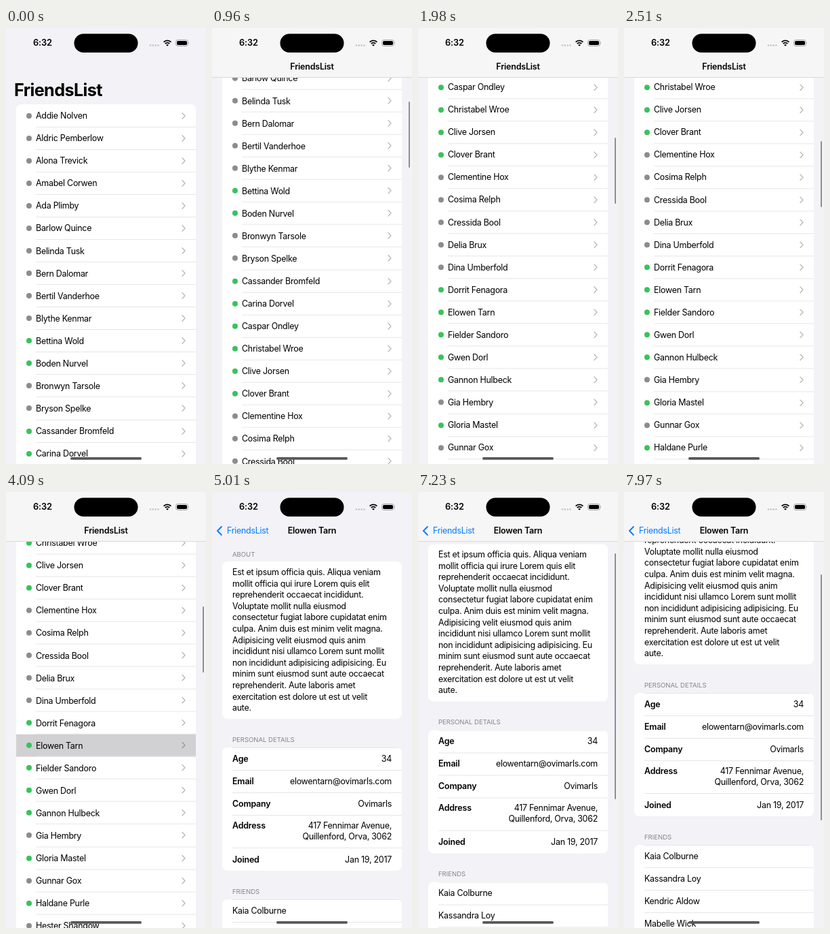
These frames come from a looping animation (295 by 640 pixels, 8 s). An HTML page:

```html
<!DOCTYPE html>
<html lang="en">
<head>
<meta charset="utf-8">
<title>FriendsList</title>
<style>
html, body { margin: 0; width: 100%; height: 100%; overflow: hidden; background: #f2f2f7; }
#stage { position: relative; width: 295px; height: 640px; overflow: hidden; color: #000;
  font: 12.5px Inter, "Noto Sans", sans-serif; letter-spacing: -.29px; }
#stage div, #stage svg { position: absolute; box-sizing: border-box; }
.page { inset: 0; background: #f2f2f7; }
.clip { inset: 73px 0 0; overflow: hidden; }
.scroll { left: 0; top: -73px; width: 295px; height: 1400px; white-space: pre; }
.bar { left: 0; top: 0; width: 295px; height: 73px; background: #f6f6f7; border-bottom: 1px solid #d9d9dc; }
.thumb { left: 290px; width: 2.4px; border-radius: 2px; background: #8f8f92; }
.card { left: 15px; width: 265px; background: #fff; border-radius: 7.5px; overflow: hidden; }
.row { left: 0; width: 265px; line-height: 33.06px; }
.line { right: 0; height: 1px; background: #e6e6e8; }
.dot { left: 15px; top: 12.5px; width: 8px; height: 8px; border-radius: 50%; }
.head { left: 30px; line-height: 14px; font-size: 9.6px; letter-spacing: -.05px; color: #86868b; }
.bold, .title { font-weight: 600; letter-spacing: -.22px; }
.value { top: 0; right: 15px; text-align: right; }
.title { left: 0; top: 47px; width: 295px; line-height: 20px; text-align: center; }
.large { left: 12px; top: 75px; font-size: 25.2px; line-height: 32px; font-weight: 700; letter-spacing: -.6px; }
.about { left: 15px; top: 8px; line-height: 16.6px; }
#back { left: 0; top: 47px; line-height: 20px; color: #007aff; }
#dim { inset: 0; background: #000; }
#time { left: 34px; width: 40px; top: 12px; line-height: 20px; font-size: 12.8px; font-weight: 600;
  text-align: center; letter-spacing: -.1px; }
</style>
</head>
<body>
<div id="stage">
  <div class="page" id="list">
    <div class="clip"><div class="scroll"><div class="large">FriendsList</div></div></div>
    <div class="bar"></div><div class="thumb" style="height:97px"></div>
  </div>
  <div id="dim"></div>
  <div class="page" id="detail">
    <div class="clip"><div class="scroll"></div></div>
    <div class="bar"></div><div class="thumb" style="height:361px"></div>
  </div>
  <div class="title" id="listTitle">FriendsList</div>
  <div class="title" id="detailTitle">Elowen Tarn</div>
  <div id="back">
    <svg width="20" height="20" style="left:0;top:0"><path d="M14 4L8 10l6 6" fill="none" stroke="#007aff" stroke-width="1.8" stroke-linecap="round" stroke-linejoin="round"/></svg>
    <div id="backLabel" style="left:22px;top:0">FriendsList</div>
  </div>
  <div id="time">6:32</div>
  <svg width="295" height="640" style="left:0;top:0">
    <rect x="100.5" y="8.5" width="94" height="27.6" rx="13.8"/>
    <path d="M213 25.5h13" stroke="#c3c3c6" stroke-width="2.6" stroke-linecap="round" stroke-dasharray="0 3.8"/>
    <g fill="none" stroke="#000" stroke-width="1.9">
      <path d="M232.6 20.6a7.6 7.6 0 0 1 10.8 0M234.8 23a4.5 4.5 0 0 1 6.4 0"/>
      <rect x="250.5" y="17.5" width="18" height="9" rx="3" stroke="#a5a5a8" stroke-width="1"/>
    </g>
    <path d="M236.2 24.9a2.5 2.5 0 0 1 3.6 0L238 26.8z"/>
    <rect x="252" y="19" width="15" height="6" rx="1.7"/>
    <path d="M269.6 20.4q1.6 1.6 0 3.2z" fill="#a5a5a8"/>
    <rect x="95" y="630" width="105" height="3.8" rx="1.9" fill="#58585a"/>
  </svg>
</div>
<script>
const ROW = 33.06, CHOSEN = 26, WIDTH = 295;
const names = `Addie Nolven,Aldric Pemberlow,Alona Trevick,Amabel Corwen,Ada Plimby,Barlow Quince,Belinda Tusk,
Bern Dalomar,Bertil Vanderhoe,Blythe Kenmar,Bettina Wold,Boden Nurvel,Bronwyn Tarsole,Bryson Spelke,
Cassander Bromfeld,Carina Dorvel,Caspar Ondley,Christabel Wroe,Clive Jorsen,Clover Brant,Clementine Hox,
Cosima Relph,Cressida Bool,Delia Brux,Dina Umberfold,Dorrit Fenagora,Elowen Tarn,Fielder Sandoro,Gwen Dorl,
Gannon Hulbeck,Gia Hembry,Gloria Mastel,Gunnar Gox,Haldane Purle,Hester Shandow`.split(/,\s*/);
const online = '00000000001100111111000001111101010';
const about = `Est et ipsum officia quis. Aliqua veniam
mollit officia qui irure Lorem quis elit
reprehenderit occaecat incididunt.
Voluptate mollit nulla eiusmod
consectetur fugiat labore cupidatat enim
culpa. Anim duis est minim velit magna.
Adipisicing velit eiusmod quis anim
incididunt nisi ullamco Lorem sunt mollit
non incididunt adipisicing adipisicing. Eu
minim sunt eiusmod sunt aute occaecat
reprehenderit. Aute laboris amet
exercitation est dolore ut est ut velit
aute.`;
const facts = [
  ['Age', '34'],
  ['Email', 'elowentarn@ovimarls.com'],
  ['Company', 'Ovimarls'],
  ['Address', '417 Fennimar Avenue,\nQuillenford, Orva, 3062'],
  ['Joined', 'Jan 19, 2017'],
];
const friends = ['Kaia Colburne', 'Kassandra Loy', 'Kendric Aldow', 'Mabelle Wick'];

const $ = s => document.querySelector(s);
const box = (cls, style, html = '') => `<div class="${cls}" style="${style}">${html}</div>`;
const card = (y, height, html) => box('card', `top:${y}px;height:${height}px`, html);
const line = (y, left) => box('line', `top:${y - .5}px;left:${left}px`);
const head = (y, text) => box('head', `top:${y - 7}px`, text);
const row = (y, html, height = ROW) => box('row', `top:${y}px;height:${height}px`, html);
const label = (left, text) => box('', `left:${left}px;top:0`, text);
const chevron = `<svg width="8" height="12" style="left:243px;top:10.5px"><path d="M2 1.8L6 6l-4 4.2"
  fill="none" stroke="#000" stroke-opacity=".27" stroke-width="1.4" stroke-linecap="round" stroke-linejoin="round"/></svg>`;

$('#list .scroll').innerHTML += card(112.2, ROW * names.length, names.map((name, i) =>
  row(i * ROW, box('dot', `background:${+online[i] ? '#38c35b' : '#8c8c90'}`) + label(29, name) + chevron)
  + line((i + 1) * ROW, 29)).join(''));

let factsHeight = 0;
const factRows = facts.map(([key, value]) => {
  const tall = value.includes('\n'), height = tall ? 48.4 : ROW;
  const shift = tall ? 'top:7.6px;line-height:16.6px' : 'top:0';
  const html = line(factsHeight, 15)
    + row(factsHeight, box('bold', `left:15px;${shift}`, key) + box('value', shift, value), height);
  factsHeight += height;
  return html;
}).join('');

$('#detail .scroll').innerHTML =
  head(92, 'ABOUT') + card(102, 230.7, box('about', '', about))
  + head(364.3, 'PERSONAL DETAILS') + card(375, factsHeight, factRows)
  + head(587.3, 'FRIENDS')
  + card(598, ROW * friends.length, friends.map((name, i) =>
      line(i * ROW, 15) + row(i * ROW, label(15, name))).join(''));

const chosenRow = document.querySelectorAll('#list .row')[CHOSEN];

// A flick: accelerating drag, then exponential slowdown.
function listOffset(t) {
  if (t < 595) return 0;
  if (t < 770) return 83 * ((t - 595) / 175) ** 2;
  return 622 - 143.5 * Math.exp((1445 - Math.min(t, 3095)) / 510);
}
const detailOffset = t => t < 6570 ? 0 : 80 * ((t - 6570) / 1400) ** 1.49;

// Critically damped spring of the page push.
function pushProgress(t) {
  if (t < 4100) return 0;
  if (t > 4590) return 1;
  const x = (t - 4100) * .016;
  return 1 - (1 + x) * Math.exp(-x);
}

const slide = (el, x, opacity = 1) => {
  el.style.transform = `translateX(${x}px)`;
  el.style.opacity = opacity;
};

function scrollPage(id, y, barAt, thumbY) {
  $(id + ' .scroll').style.transform = `translateY(${-y}px)`;
  $(id + ' .bar').style.opacity = y > barAt ? 1 : 0;
  const thumb = $(id + ' .thumb').style;
  thumb.top = thumbY + 'px';
  thumb.opacity = y > 0 ? 1 : 0;
}

function draw(now) {
  // The screen refreshes every 75 ms.
  const t = 20 + 75 * Math.floor((now % 8000 - 20) / 75);
  const y = listOffset(t), dy = detailOffset(t), p = pushProgress(t);
  scrollPage('#list', y, 36, 74.3 + .152 * y);
  scrollPage('#detail', dy, 0, 75.5 + .569 * dy);
  chosenRow.style.background = t > 4050 ? '#d1d1d4' : '';

  slide($('#list'), -.3 * WIDTH * p);
  slide($('#detail'), WIDTH * (1 - p));
  $('#dim').style.opacity = .1 * p;
  slide($('#listTitle'), -94 * p, y > 36 ? Math.max(0, 1 - 1.5 * p) : 0);
  slide($('#detailTitle'), 120 * (1 - p), p);
  slide($('#backLabel'), 94 * (1 - p));
  $('#back').style.opacity = p;
  requestAnimationFrame(() => draw(performance.now() - start));
}
const start = performance.now();
draw(0);
</script>
</body>
</html>
```
